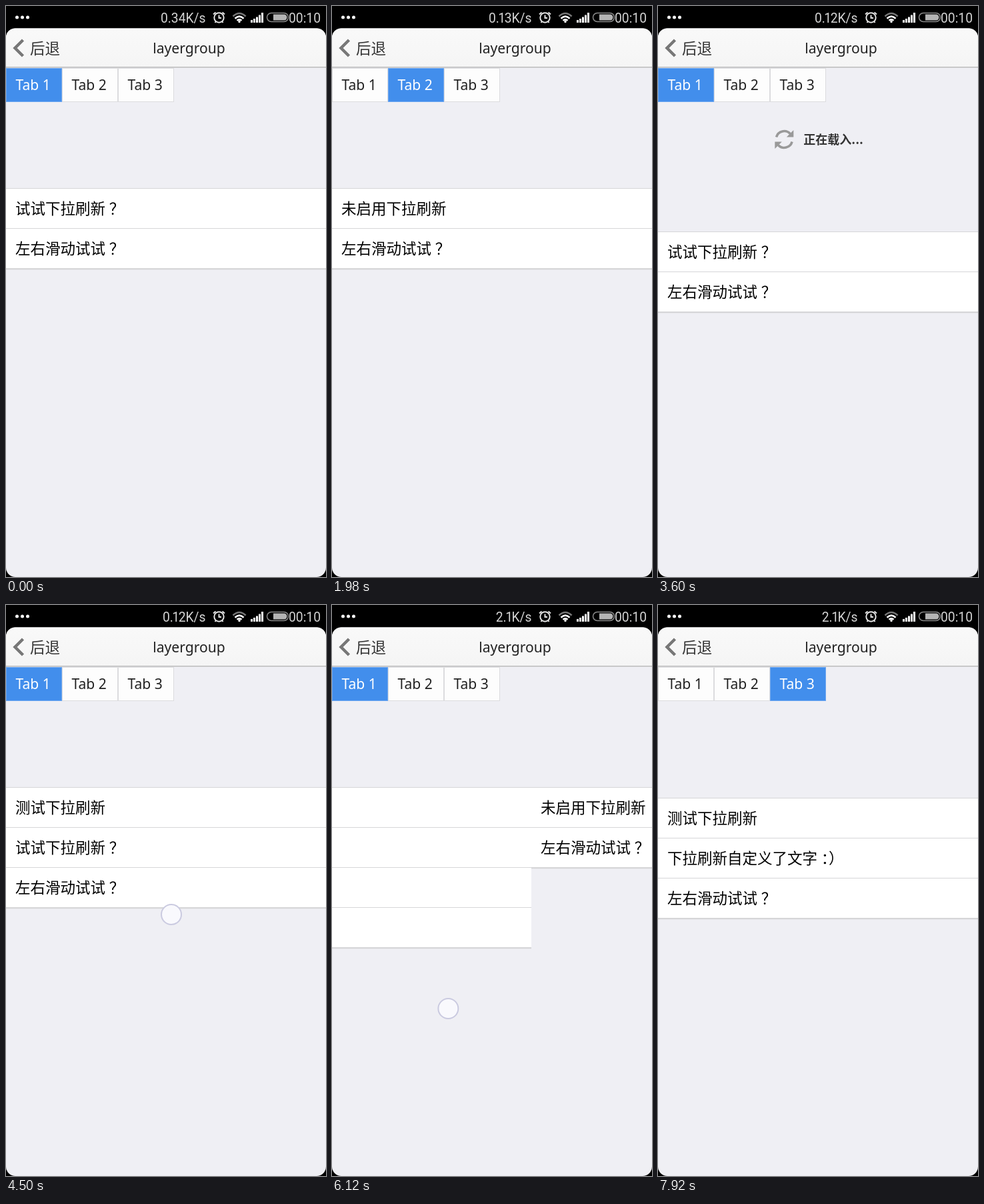
Recreate the animation shown at these times as an HTML page. Size 480 by 856 pixels, loop 8 s.

```html
<!DOCTYPE html>
<html lang="zh-CN">
<head>
<meta charset="utf-8">
<style>
  html, body { margin: 0; width: 100%; height: 100%; overflow: hidden; background: #000; }
  svg { display: block; width: 100vw; height: 100vh; }
  .cn { font: 22.5px "Noto Sans CJK SC", "Noto Sans CJK", sans-serif; }
  .tip { font: bold 18px "Noto Sans CJK SC", "Noto Sans CJK", sans-serif; fill: #333; }
  .ui { font: 21.1px "Noto Sans", sans-serif; fill: #222; }
  .bar { font: 19.3px Roboto, sans-serif; fill: #d4d4d4; }
</style>
</head>
<body>
<svg viewBox="0 0 480 856">
  <defs>
    <clipPath id="page"><rect y="33.5" width="480" height="822.5" rx="14"/></clipPath>
    <clipPath id="area"><rect y="167" width="480" height="689"/></clipPath>
    <linearGradient id="nav" x2="0" y2="1"><stop stop-color="#f9f9f9"/><stop offset="1" stop-color="#f5f5f5"/></linearGradient>
    <g id="half">
      <path d="M-11.8-3.5A12.3 12.3 0 0 1 9-8.5" fill="none" stroke="#999" stroke-width="3.6"/>
      <path d="M14-14V-3.5H3.5Z" fill="#999"/>
    </g>
    <g id="spin"><use href="#half"/><use href="#half" transform="rotate(180)"/></g>
    <g id="down" fill="none" stroke="#999" stroke-width="3.4">
      <circle r="12.5"/><path d="M0-7V6M-5 1L0 6L5 1"/>
    </g>
  </defs>

  <rect width="480" height="856"/>
  <path d="M16.5 17h0M24.5 17h0M32.5 17h0" stroke="#fff" stroke-width="5" stroke-linecap="round"/>
  <text id="speed" class="bar" x="299.5" y="24.5" text-anchor="end"/>
  <g fill="none" stroke="#e4e4e4" stroke-width="2">
    <circle cx="319.5" cy="17.5" r="7.2"/>
    <path d="M319.5 13.5V18H323M311 12.5L314.5 9.5M328 12.5L324.5 9.5M313.5 25L315 23M325.5 25L324 23"/>
  </g>
  <g fill="none" stroke-width="2.6">
    <path d="M340.5 15.5Q350 6.5 359.5 15.5" stroke="#777"/>
    <path d="M343.5 18.8Q350 12.5 356.5 18.8M346.5 21.8Q350 18.8 353.5 21.8" stroke="#fff"/>
    <circle cx="350" cy="23.5" r="1.7" fill="#fff"/>
  </g>
  <path d="M368.5 25v-4M372.5 25v-6M376.500 25v-8.500M380.5 25v-11.500M384.5 25v-15" stroke="#fff" stroke-width="3"/>
  <rect x="391.5" y="10.5" width="32" height="13" rx="6.5" fill="none" stroke="#888" stroke-width="1.5"/>
  <path d="M401 12.5H417a4.5 4.5 0 0 1 0 9H401Z" fill="#b4b4b4"/>
  <text class="bar" x="424" y="24.5">00:10</text>

  <g clip-path="url(#page)">
    <rect y="33" width="480" height="823" fill="#efeff4"/>
    <rect y="33" width="480" height="58" fill="url(#nav)"/>
    <rect y="91" width="480" height="1.5" fill="#bbb"/>
    <path d="M25.5 51L13.5 63L25.5 75" fill="none" stroke="#777" stroke-width="4.5"/>
    <text class="cn" x="36" y="71.5" fill="#333">后退</text>
    <text class="ui" x="274.5" y="70.5" text-anchor="middle">layergroup</text>
    <g id="tabs"></g>
    <g id="panels" clip-path="url(#area)"></g>
    <circle id="touch" r="15" fill="#f9f9fd" stroke="#cacae0" stroke-width="2"/>
  </g>
</svg>
<script>
const $ = id => document.getElementById(id);
const LOOP = 8000, STEP = 180, WIDTH = 480, ROW = 60;
const DRAG = 360, SETTLED = 500, LOADED = 780, CLOSED = 900;

const swipes = [
  { at: 360, dur: 720, from: 0, to: 1, y: 490 },
  { at: 2160, dur: 720, from: 1, to: 0, y: 490 },
  { at: 5760, dur: 720, from: 0, to: 1, y: 605 },
  { at: 6480, dur: 360, from: 1, to: 2, y: 591 }
];
const pulls = [
  { at: 1260, tab: 1, y: 560, far: 135 },
  { at: 3060, tab: 0, y: 387, far: 105 },
  { at: 4500, tab: 0, y: 464, far: 110 },
  { at: 7050, tab: 2, y: 488, far: 150 }
];
const speeds = [[0, '0.34K/s'], [1620, '0.13K/s'], [3420, '0.12K/s'], [5940, '2.1K/s']];
const panels = [
  { head: '试试下拉刷新？', hint: '下拉刷新', hold: 64.5 },
  { head: '未启用下拉刷新', hold: 0 },
  { head: '下拉刷新自定义了文字：）', hint: '快点拉我：）', hold: 65 }
];

const clamp = k => Math.min(1, Math.max(0, k));
const mix = (a, b, k) => a + (b - a) * k;
const within = (t, at, dur) => t >= at && t <= at + dur;
// nudge full-width punctuation to the middle of its cell
const punct = s => s.replace(/[？：]/g, '<tspan dx=".25em">$&</tspan>');

const progress = (s, t) => clamp((t - s.at) / s.dur);
const travel = (s, t) => (s.to - s.from) * progress(s, t) ** 1.41;

// finger drags at half speed, panel rests while loading, then closes
function offset({ at, tab, far }, t) {
  const age = t - at, { hold } = panels[tab];
  if (age <= DRAG) return far * clamp(age / DRAG) ** 2;
  if (age < SETTLED) return mix(far, hold, (age - DRAG) / (SETTLED - DRAG));
  return hold * (1 - clamp((age - LOADED) / (CLOSED - LOADED)));
}

function rows(i, t) {
  const { head, hold } = panels[i];
  const added = pulls.filter(p => p.tab == i && hold && t >= p.at + LOADED);
  const list = [...added.map(() => '测试下拉刷新'), head, '左右滑动试试？'];
  return `<rect y="273" width="${WIDTH}" height="${list.length * ROW + 2.3}" fill="#d6d6d8"/>` +
    list.map((s, n) => `<rect y="${274 + n * ROW}" width="${WIDTH}" height="59" fill="#fff"/>` +
      `<text class="cn" x="14" y="${312 + n * ROW}">${punct(s)}</text>`).join('');
}

function loader({ hint, hold }, y, age) {
  const busy = age > DRAG && age < LOADED, ready = y > hold;
  const tip = busy ? '正在载入...' : ready && hint.length < 5 ? '释放立即刷新' : hint;
  const left = 240 - (43 + (busy ? 4.8 : tip.length) * 18) / 2;
  const turn = busy ? age / 2 - 270 : ready ? 180 : 0;
  return `<use href="#${busy ? 'spin' : 'down'}" transform="translate(${left + 14} 135) rotate(${turn})"/>` +
    `<text class="tip" x="${left + 43}" y="141.5">${punct(tip)}</text>`;
}

function finger(t) {
  const s = swipes.find(s => within(t, s.at, s.dur / 2));
  if (s) return [240 + (s.to - s.from) * 115 - travel(s, t) * WIDTH, s.y];
  const p = pulls.find(p => within(t, p.at, DRAG));
  return p && [248, p.y + 2 * offset(p, t)];
}

function draw(t) {
  const page = swipes.reduce((x, s) => x + travel(s, t), 0);
  const tab = swipes.reduce((n, s) => progress(s, t) < .75 ? n : s.to, 0);
  const pull = pulls.find(p => within(t, p.at, CLOSED));

  $('speed').innerHTML = speeds.findLast(s => s[0] <= t)[1]
    .replace(/1(.*)/, '<tspan dx="-1.5">1</tspan><tspan dx="-1.5">$1</tspan>');
  $('tabs').innerHTML = panels.map((_, i) => {
    const [fill, line, ink] = i == tab ? ['#428eec', '#6fa8f0', '#fff'] : ['#fdfdfd', '#dcdcde', '#222'];
    return `<rect x="${i * 84 + .5}" y="93.5" width="83" height="50" fill="${fill}" stroke="${line}"/>` +
      `<text class="ui" x="${i * 84 + 14.5}" y="126" style="fill:${ink}">Tab ${i + 1}</text>`;
  }).join('');
  $('panels').innerHTML = panels.map((p, i) => {
    const y = pull?.tab == i ? offset(pull, t) : 0;
    return `<g transform="translate(${Math.round((i - page) * WIDTH)} ${Math.round(y)})">` +
      (y && p.hint ? loader(p, y, t - pull.at) : '') + rows(i, t) + '</g>';
  }).join('');

  const spot = finger(t);
  $('touch').setAttribute('opacity', spot ? 1 : 0);
  if (spot) $('touch').setAttribute('transform', `translate(${spot})`);
}

let shown = -1;
function tick(now) {
  const step = Math.floor(now % LOOP / STEP);
  if (step != shown) draw((shown = step) * STEP);
  requestAnimationFrame(tick);
}
draw(0);
requestAnimationFrame(tick);
</script>
</body>
</html>
```
